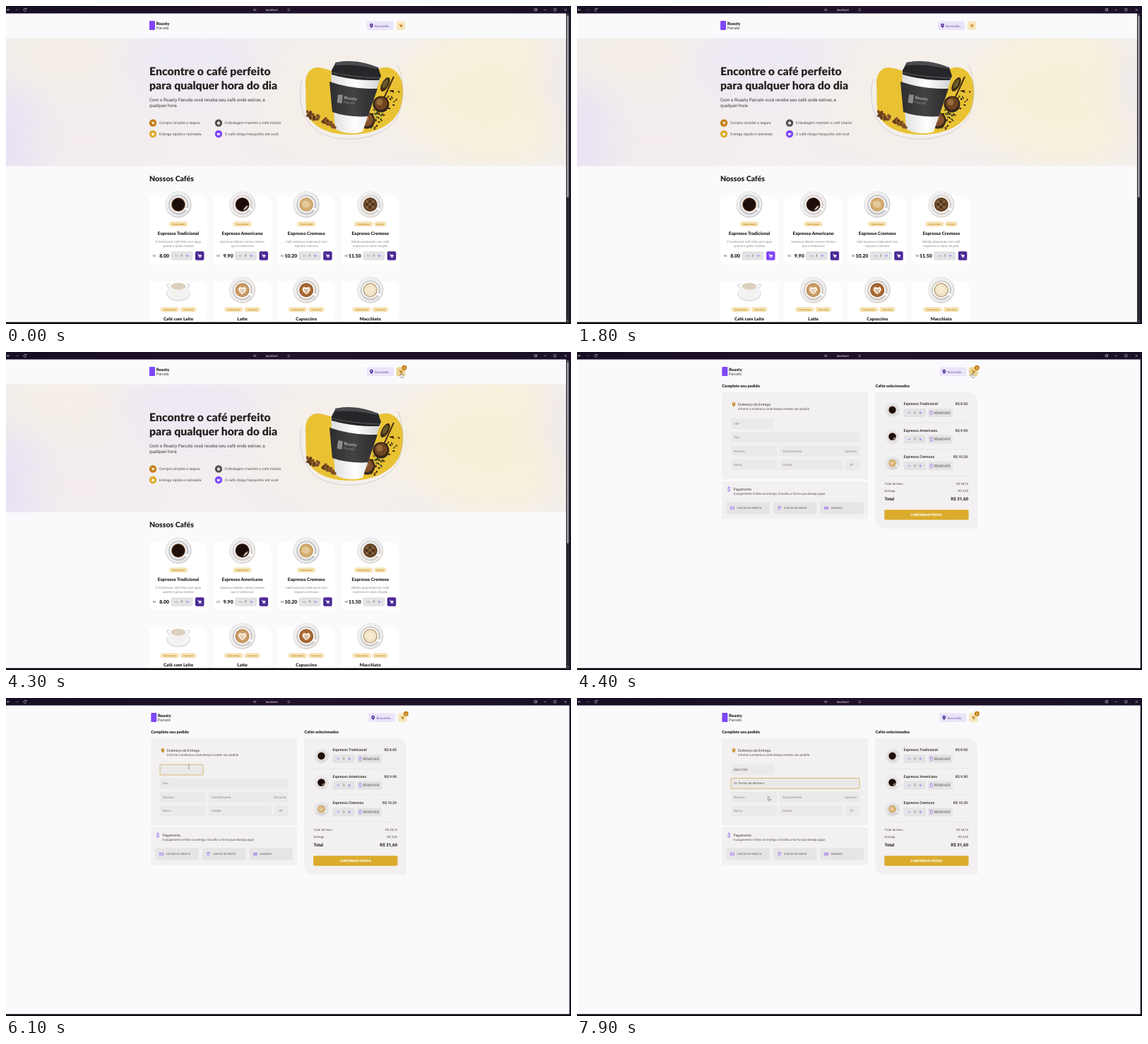
An HTML page for the animation above (8 s loop, 800 by 450 pixels).

```html
<!DOCTYPE html>
<html lang="pt-BR">
<head>
<meta charset="utf-8">
<title>Roasty Parcels</title>
<style>
html, body { margin: 0; width: 100%; height: 100%; overflow: hidden; background: #fafafc; }
svg { display: block; width: 800px; height: 450px; }
text { font-family: Roboto, sans-serif; text-rendering: geometricPrecision; white-space: pre; }
.h { font-family: Lato, sans-serif; font-weight: 900; }
</style>
</head>
<body>
<svg id="stage" viewBox="0 0 800 450"></svg>
<script>
const LOOP = 8000;
const INK = '#272221', TEXT = '#574f4d', LABEL = '#8d8686', GOLD = '#c47f17', YELLOW = '#dbac2c',
  PURPLE = '#8047f8', DEEP = '#4b2995';

// Drawing helpers
const text = (x, y, s, size, fill = TEXT, extra = '') =>
  `<text x="${x}" y="${y}" font-size="${size}" fill="${fill}" ${extra}>${s}</text>`;
const rect = (x, y, w, h, fill, r = 0, extra = '') =>
  `<rect x="${x}" y="${y}" width="${w}" height="${h}" rx="${r}" fill="${fill}" ${extra}/>`;
const disc = (x, y, r, fill, extra = '') => `<circle cx="${x}" cy="${y}" r="${r}" fill="${fill}" ${extra}/>`;
const oval = (x, y, rx, ry, fill, turn = 0, extra = '') =>
  `<ellipse rx="${rx}" ry="${ry}" fill="${fill}" transform="translate(${x} ${y}) rotate(${turn})" ${extra}/>`;
const path = (d, fill, extra = '') => `<path d="${d}" fill="${fill}" ${extra}/>`;
const line = (d, stroke, w = .6, extra = '') => path(d, 'none', `stroke="${stroke}" stroke-width="${w}" ${extra}`);
const at = (x, y, s, extra = '') => `<g transform="translate(${x} ${y})" ${extra}>${s}</g>`;
const MID = 'text-anchor="middle"', END = 'text-anchor="end"', HEAD = 'class="h"';

const cartIcon = (x, y, c, k = 1) => at(x, y,
  `<g transform="scale(${k})">` + line('M-3-2.4h1.1l1.2 3.6h2.8', c, .7) +
  path('M-1.8-1.7h4.8l-.9 2.7h-3z', c) + disc(-.4, 2.3, .65, c) + disc(1.9, 2.3, .65, c) + '</g>');
const pin = (x, y, c, hole) =>
  path(`M${x} ${y + 3}q-2.4-2.4-2.4-3.8a2.4 2.4 0 0 1 4.8 0q0 1.4-2.4 3.8z`, c) + disc(x, y - .8, .9, hole);

let seed = 7;
const rnd = () => (seed = seed * 16807 % 2147483647) / 2147483647;

// Coffee seen from above: [saucer, rim, liquid, art]
const drinks = [
  ['#c9c9cd', '#7a5236', '#1d0f09', ''],
  ['#d9d2cf', '#4a2a1e', '#1b0c08', 'shine'],
  ['#c6c7cb', '#c39a63', '#d3ac70', 'foam'],
  ['#d8d2cd', '#57391f', '#6d4a2a', 'ice'],
  ['#d9d9dc', '#efe9e1', '#ded0be', 'milk'],
  ['#d3cdc9', '#b5834d', '#c99c66', 'leaf'],
  ['#d0c8c1', '#8a5128', '#a8672f', 'leaf'],
  ['#cfcfca', '#a98a5a', '#efe3c8', 'foam']
];
function drink(i, x, y, r) {
  const [saucer, rim, liquid, art] = drinks[i];
  let s = disc(0, 0, 18.5, saucer) + disc(-.4, -.6, 17.6, '#efeff0') + disc(.3, .5, 14.2, saucer) +
    rect(8, -1.4, 8.5, 2.8, '#fff', 1.2, 'transform="rotate(28)"') +
    disc(0, 0, 11.8, '#fbfafa') + disc(0, 0, 10, rim) + disc(0, 0, 8.9, liquid);
  if (art === 'shine') s += path('M1 8q6-1 7-7q-4 1-7 7z', '#cbbdb8');
  if (art === 'foam') s += oval(-.6, -.4, 5.8, 5, '#fff4d8', 20, 'opacity=".4"');
  if (art === 'ice') for (let k = 0; k < 9; k++)
    s += rect(-6 + k % 3 * 4.2, -5.5 + (k / 3 | 0) * 4, 2.8, 2.4, k % 2 ? '#3f2a1a' : '#8f6c46', .7);
  if (art === 'leaf') s += path('M0 6q-8-5-4.5-10q3-1.5 4.5 1q1.5-2.5 4.5-1q3.5 5-4.5 10z', '#f7eddd') +
    line('M-3-1q3 3 6 0M-2 2q2 2 4 0', rim, .8);
  if (art === 'milk') s = oval(0, 5, 17, 11, '#e3e3e6') + oval(0, 4, 15.5, 9.5, '#f5f5f6') +
    line('M-10-3q-6 0-6-5q4-1 7 2M10-3q6 0 6-5q-4-1-7 2', '#dedee1', 1.6) +
    path('M-12-7Q-11 11 0 11Q11 11 12-7z', '#f3f1ef') + oval(0, -6, 12, 6.5, '#fff') + oval(0, -5.4, 10.5, 5.2, liquid);
  return `<g transform="translate(${x} ${y}) scale(${r / 18.5})">${s}</g>`;
}

function header(dx) {
  return at(dx, 0,
    rect(203, 21, 8, 13, PURPLE, 1) +
    text(212.8, 26.6, 'Roasty', 6, INK, HEAD) + text(212.8, 32.6, 'Parcels', 5.4, '#403937') +
    rect(511, 21.5, 38, 12.8, '#ebe5f9', 2) + pin(517.5, 28, DEEP, '#ebe5f9') +
    text(522.3, 29.5, 'Buscando...', 4.4, DEEP, 'opacity=".8"') +
    rect(552.8, 21.5, 12.5, 12.8, '#f6e8c0', 2, 'class="cart"') + cartIcon(559, 28, GOLD, .85) +
    at(564, 22.3, disc(0, 0, 3.5, GOLD) +
      text(0, 1.3, '', 3.7, '#fff', MID + ' class="count" font-weight="700"'), 'class="badge"'));
}

function heroCup() {
  let s = path('M424 112C423 96 431 86 443 87C462 89 480 104 498 101C515 98 529 82 545 88C562 95 567 121 558 145C549 168 523 181 490 182C455 183 426 168 425 145C424 132 425 124 424 112z', '#e9c234') +
    line('M419 104C412 136 421 167 446 180C487 199 543 184 556 153C564 132 563 102 555 84', '#b0abc8', .5);
  // Bowls, spoon and loose spices
  for (let i = 0; i < 70; i++) {
    const k = rnd();
    s += oval(552 - k * 38 + rnd() * 10 - 5, 124 + k * 42 + rnd() * 22 - 9, 1.8, 1, ['#5c3518', '#4d5f2c', '#241710'][i % 3], rnd() * 180);
  }
  s += line('M528 146L549 100', '#4a2d18', 2) + oval(537, 111, 5, 11, '#3f2b17', 28) + oval(537, 110, 3, 7, '#6a5a28', 28) +
    disc(531, 139, 11.5, '#33241c') + disc(531, 138, 9, '#704521') + disc(529, 136, 4.5, '#9a6b3b') +
    disc(511, 162, 11.5, '#3b281b') + disc(511, 161, 9, '#80522b') + disc(509, 159, 4.5, '#a3713d');
  // Paper cup
  s += path('M460 95L530 102L505 178Q484 184 466 174z', 'url(#paper)') +
    path('M458 107Q490 118 526 117L512.5 156Q485 158 462 150z', 'url(#sleeve)') +
    path('M461 91L467 80Q495 75 527 87L531 99L528 105Q491 106 461 97z', '#262729') +
    path('M466 80Q497 74 526 87L525 89Q495 82 467 84z', '#4a4b4e') +
    line('M461 94Q492 101 530 102', '#55565a', 1.2);
  s += `<g transform="translate(470 126) rotate(7)">${rect(0, -1, 7, 12, '#8b8b8d', 1)}` +
    text(9, 4.5, 'Roasty', 6, '#a5a5a7', HEAD) + text(9, 10.5, 'Parcels', 5, '#8f8f92') + '</g>';
  // Loose beans
  for (let i = 0; i < 28; i++) {
    const x = 427 + rnd() * 40, y = 153 + (x - 427) * .42 + rnd() * 8 - 4, a = rnd() * 180;
    s += oval(x, y, 3, 2, i % 2 ? '#6f431f' : '#8f5c2e', a) + oval(x, y, 2.4, .3, '#3a200e', a);
  }
  return s;
}

function card(i, name, price, lines, tags) {
  const x = 244 + i % 4 * 90.6, y = i < 4 ? 0 : 121;
  const widths = tags.map(t => t.length * 1.8 + 6.3);
  let left = -(widths.reduce((a, b) => a + b) + 2 * (tags.length - 1)) / 2;
  let s = path('M-39 269H30Q41 269 41 280V364Q41 366 39 366H-30Q-41 366-41 355V271Q-41 269-39 269z', '#fff') +
    drink(i, 0, 281, 18.5);
  tags.forEach((t, k) => {
    s += rect(left, 305, widths[k], 7, '#f5e3b5', 3.5) +
      text(left + widths[k] / 2, 309.7, t, 2.9, GOLD, MID + ' font-weight="500"');
    left += widths[k] + 2;
  });
  s += text(0, 323.5, name, 6.35, INK, `${HEAD} ${MID}`);
  if (price) s += lines.map((l, k) => text(0, 335 + k * 5.5, l, 4.35, LABEL, MID)).join('') +
    text(-36.3, 355.3, 'R$', 4) + text(-12.9, 355.8, price, 7, INK, `${HEAD} ${END}`) +
    counter(-10.5, 347.3, 31, 12.5) +
    rect(24, 347.3, 12.5, 12.5, DEEP, 2, 'class="buy"') + cartIcon(30.2, 353.5, '#fff', .95);
  return at(x, y, s);
}

const counter = (x, y, w, h) => rect(x, y, w, h, '#e4e3e3', 2) +
  line(`M${x + 5.8} ${y + h / 2}h4M${x + w - 9.8} ${y + h / 2}h4m-2-2v4`, PURPLE, .55) +
  text(x + w / 2, y + h / 2 + 1.8, 1, 5, INK, MID);

function home() {
  const glow = [[0, 190, 60, 80, '#e9e1f3'], [100, 70, 110, 50, '#f4eee6'], [110, 190, 80, 50, '#f2ebee'],
    [260, 80, 110, 60, '#eee9f3'], [480, 130, 130, 90, '#f4efe9'], [690, 125, 130, 100, '#f7f0d9'], [805, 110, 40, 70, '#eee8f0']];
  return header(0) + '<g clip-path="url(#heroClip)">' + rect(0, 44, 793, 186, '#f3eeef') +
    '<g filter="url(#soft)">' + glow.map(g => oval(...g)).join('') + '</g></g>' +
    rect(0, 44, 793, 3, 'url(#fade)') + rect(0, 225, 793, 3, 'url(#fade)', 0, 'transform="rotate(180 396.5 226.5)"') +
    text(203, 97.5, 'Encontre o café perfeito', 15.85, INK, HEAD) +
    text(203, 117.5, 'para qualquer hora do dia', 15.85, INK, HEAD) +
    text(203, 134.5, 'Com o Roasty Parcels você recebe seu café onde estiver, a', 6.3, '#403937') +
    text(203, 143, 'qualquer hora', 6.3, '#403937') +
    [[208, 165.5, GOLD, 'Compra simples e segura'], [301, 165.5, TEXT, 'Embalagem mantém o café intacto'],
     [208, 181, YELLOW, 'Entrega rápida e rastreada'], [301, 181, PURPLE, 'O café chega fresquinho até você']]
      .map(([x, y, c, s], i) => disc(x, y, 5.2, c) + text(x + 9, y + 1.7, s, 5.1) + [
        cartIcon(x, y, '#fff', .75),
        path(`M${x - 2} ${y - 1}l2-1.3 2 1.3v2.3l-2 1.2-2-1.2z`, '#fff') + line(`M${x - 2} ${y - 1}l2 1 2-1m-2 1v2`, c, .4),
        disc(x, y + .3, 1.9, '#fff') + line(`M${x} ${y + .4}v-1.2M${x - .7} ${y - 2.2}h1.4`, c, .4),
        path(`M${x - 2} ${y - 1}h3.4v1.6a1.7 1.7 0 0 1-3.4 0z`, '#fff') + line(`M${x + 1} ${y - .6}h1.2v1.3h-1.2`, '#fff', .4)
      ][i]).join('') +
    heroCup() + text(203, 248.3, 'Nossos Cafés', 10.5, INK, HEAD) +
    [['Expresso Tradicional', '8.00', ['O tradicional café feito com água', 'quente e grãos moídos'], ['TRADICIONAL']],
     ['Expresso Americano', '9.90', ['Expresso diluído, menos intenso', 'que o tradicional'], ['TRADICIONAL']],
     ['Expresso Cremoso', '10.20', ['Café expresso tradicional com', 'espuma cremosa'], ['TRADICIONAL']],
     ['Expresso Cremoso', '11.50', ['Bebida preparada com café', 'expresso e cubos de gelo'], ['TRADICIONAL', 'GELADO']],
     ...['Café com Leite', 'Latte', 'Capuccino', 'Macchiato'].map(n => [n, '', [], ['TRADICIONAL', 'COM LEITE']])]
      .map((c, i) => card(i, ...c)).join('') +
    rect(793, 10, 5, 437, '#2a282e') + rect(794, 14, 2.8, 257, '#98979c', 1.4) +
    path('M794 13l1.3-1.5 1.3 1.5zM794 444l1.3 1.5 1.3-1.5z', '#98979c');
}

const field = (x, y, w, label, id = '', lx = 4) =>
  rect(x, y, w, 14.7, '#ebe9e9', 1.3, id && `id="${id}" stroke-width=".7"`) +
  text(x + lx, y + 8.9, label, 4.4, LABEL, id && `id="${id}Text"`);

function checkout() {
  const box = '#f2f0f0';
  let s = header(2.3) +
    text(205.2, 50.3, 'Complete seu pedido', 5.7, INK, HEAD) + text(422.5, 50.3, 'Cafés selecionados', 5.7, INK, HEAD) +
    rect(205.2, 57, 207, 123, box, 2) + pin(222, 74.5, GOLD, box) +
    text(228, 75.5, 'Endereço de Entrega', 5, '#403937') +
    text(228, 82, 'Informe o endereço onde deseja receber seu pedido', 4.4) +
    field(218, 94.2, 61, 'CEP', 'zip') + field(218, 113.5, 182, 'Rua', 'street') +
    field(218, 132.9, 65.5, 'Número') + field(287, 132.9, 113, 'Complemento') +
    text(396, 141.8, 'Opcional', 4.4, LABEL, END + ' font-style="italic"') +
    field(218, 152.3, 65.5, 'Bairro') + field(287, 152.3, 89, 'Cidade') + field(379.5, 152.3, 20.5, 'UF', '', 7) +
    rect(205.2, 183.3, 207, 53, box, 2) + text(215, 197, '$', 8, PURPLE, MID) +
    text(221.5, 195.5, 'Pagamento', 5, '#403937') +
    text(221.5, 202, 'O pagamento é feito na entrega. Escolha a forma que deseja pagar', 4.4) +
    ['CARTÃO DE CRÉDITO', 'CARTÃO DE DÉBITO', 'DINHEIRO'].map((t, i) => {
      const x = 211.5 + i * 66.5;
      return rect(x, 212.3, 61.5, 17, '#e6e5e5', 2) + text(x + 15, 222.1, t, 3.65) +
        line(i === 1 ? `M${x + 6.2} 222.8h4.6m-4-1.5v-1.5m1.7 1.5v-1.5m1.7 1.5v-1.5m-3.9-.5l2.2-1.3 2.2 1.3z`
          : `M${x + 6} 219.2h5v3.4h-5zm0 1.2h5${i ? 'm-3.3 0v1.2h1.6v-1.2' : ''}`, PURPLE, .5);
    }).join('');
  s += path('M424.5 57H553Q567 57 567 71V248Q567 250 565 250H436.5Q422.5 250 422.5 236V59Q422.5 57 424.5 57z', box);
  ['Tradicional 8.00', 'Americano 9.90', 'Cremoso 10.20'].forEach((item, i) => {
    const y = i * 37.6, [name, price] = item.split(' ');
    s += at(0, y, drink(i, 446.5, 82, 10) + text(462.5, 75.2, 'Expresso ' + name, 5.2, INK, 'font-weight="500"') +
      text(553, 75.2, 'R$ ' + price, 5, INK, END + ' font-weight="500"') + counter(462.5, 80, 31.5, 12) +
      rect(497, 80, 35, 12, '#e4e3e3', 2) + line('M499.7 84h3.8m-3.3 0v4.3h2.8V84m-2-1h1.2', PURPLE, .5) +
      text(505.5, 87.8, 'REMOVER', 5) + rect(435.5, 99.8, 118.5, .5, '#dedcdc'));
  });
  [['Total de itens', '28,10', 188, 4.4], ['Entrega', '3,50', 198, 4.4], ['Total', '31,60', 209.8, 6.2, 'font-weight="700"']]
    .forEach(([l, v, y, size, w = '']) => {
      s += text(435.5, y, l, size, w ? INK : TEXT, w) + text(554, y, 'R$ ' + v, size, w ? INK : TEXT, `${END} ${w}`);
    });
  return s + rect(435.2, 223.2, 119.3, 14.2, YELLOW, 2) +
    text(494.8, 232, 'CONFIRMAR PEDIDO', 4.7, '#fff', MID + ' font-weight="700"') +
    rect(0, 0, .5, 5, INK, 0, 'id="caret"');
}

const browser = rect(0, 0, 800, 10.5, 'url(#bar)') + rect(797.7, 10, 2.3, 440, '#1c1328') + rect(0, 447.3, 800, 2.7, '#0d0a12') +
  line('M5.5 5.3h-4m1.7-1.7l-1.7 1.7 1.7 1.7', '#d5d0dc') +
  line('M13 5.3h4m-1.7-1.7l1.7 1.7-1.7 1.7', '#5c5268') +
  line('M28.6 4.2a2 2 0 1 0 .2 1.8M28.8 3v1.5h-1.5', '#d5d0dc') +
  line('M350.5 4.3h3.5v2.2h-3.5zm1.7 0v2.2M398.5 4.3h3.6m-3.6 2.2h3.6m-2.6-3v1.6m1.5.6v1.6', '#aaa2b2', .5) +
  text(376.2, 6.8, 'localhost', 4.2, '#eae6ef', MID) +
  line('M748.2 3.7h3.4v3.2h-3.4zm2.1 0v3.2M761.5 5.3h3.3M775.7 3.7h3.2v3.2h-3.2zM790.7 3.7l3.3 3.3m0-3.3l-3.3 3.3', '#d5d0dc', .55);

const grad = (id, a, b, c, dir = '') =>
  `<linearGradient id="${id}" ${dir}><stop stop-color="${a}"/><stop offset=".5" stop-color="${b}"/><stop offset="1" stop-color="${c}"/></linearGradient>`;
const outline = 'stroke="#333" stroke-width=".45"';

document.getElementById('stage').innerHTML = '<defs>' +
  grad('bar', '#170e24', '#20122a', '#1a1027') + grad('paper', '#dcdcdd', '#fff', '#d2d2d5') +
  grad('sleeve', '#2e2e30', '#434346', '#2b2b2d') +
  grad('fade', '#fafafc', 'rgba(250,250,252,.5)', 'rgba(250,250,252,0)', 'x2="0" y2="1"') +
  '<clipPath id="heroClip"><rect y="45" width="793" height="183"/></clipPath>' +
  '<filter id="soft" filterUnits="userSpaceOnUse" x="-100" y="-60" width="1000" height="400"><feGaussianBlur stdDeviation="26"/></filter></defs>' +
  rect(0, 0, 800, 450, '#fafafc') + `<g id="home">${home()}</g><g id="checkout">${checkout()}</g>` + browser +
  '<g id="cursor">' +
  path('M-.8 0v-2.4a.65.65 0 0 1 1.3 0V-.6l2 .5q.6.2.5.9L2.4 3.3H-.6L-2.4.8q-.2-.9.6-.8z', '#fff', outline) +
  path('M0-2.8V2.8L1.4 1.6L2.3 3.5L3.1 3.1L2.3 1.3H4z', '#fff', outline) +
  line('M-1-2.6h2M0-2.6v5.2M-1 2.6h2', '#555', .5) + '</g>';

// Timeline, in ms
const BUY = [[1500, 2050], [2250, 2650], [2800, 3400]];
const CART = [3900, 4750];
const ADDED = [1900, 2500, 3200];
const PAGE = 4400, ZIP = 5500, ZIP_FILL = 6400, STREET = 7300, STREET_FILL = 7600;
const CARETS = [[5500, 6100, 222, 99], [6400, 6900, 242.5, 99], [7300, 7600, 222, 118.3]];
const MOVES = [[1900, 276, 355], [2050, 276, 355], [2300, 366, 356], [2600, 366, 356], [2850, 459, 358.5], [3300, 459, 358.5],
  [3950, 560, 33], [4600, 560, 33], [5400, 259, 97], [6700, 259, 97], [7100, 270, 118], [7600, 270, 118], [7900, 270.5, 142]];

const $ = id => document.getElementById(id);
const all = sel => [...document.querySelectorAll(sel)];
const show = (el, on) => { el.style.display = on ? '' : 'none'; };
const within = (t, [a, b]) => t >= a && t < b;
const buys = all('.buy'), carts = all('.cart'), badges = all('.badge'), counts = all('.count');
const pointers = [...$('cursor').children];

function pointerAt(t) {
  const i = MOVES.findIndex(m => m[0] > t);
  if (i < 1) return (i ? MOVES[MOVES.length - 1] : MOVES[0]).slice(1);
  const [t0, x0, y0] = MOVES[i - 1], [t1, x1, y1] = MOVES[i];
  const p = (t - t0) / (t1 - t0), k = p * p * (3 - 2 * p);
  return [x0 + (x1 - x0) * k, y0 + (y1 - y0) * k];
}

function fill(id, t, from, to, typed, label, value) {
  const focus = within(t, [from, to]), content = $(id + 'Text');
  $(id).setAttribute('stroke', focus ? '#d2a044' : 'none');
  content.textContent = t >= typed ? value : focus ? '' : label;
  content.setAttribute('fill', t >= typed ? TEXT : LABEL);
}

function render(t) {
  show($('home'), t < PAGE);
  show($('checkout'), t >= PAGE);
  buys.forEach((b, i) => b.setAttribute('fill', BUY[i] && within(t, BUY[i]) ? PURPLE : DEEP));
  carts.forEach(c => c.setAttribute('fill', within(t, CART) ? '#ecd496' : '#f6e8c0'));
  const n = ADDED.filter(a => t >= a).length;
  badges.forEach(b => show(b, n));
  counts.forEach(c => { c.textContent = n; });

  fill('zip', t, ZIP, STREET, ZIP_FILL, 'CEP', '00417352');
  fill('street', t, STREET, LOOP, STREET_FILL, 'Rua', 'Av Tordos de Melvanir');
  const caret = CARETS.find(c => within(t, c));
  show($('caret'), caret);
  if (caret) $('caret').setAttribute('transform', `translate(${caret[2]} ${caret[3]})`);

  const hand = BUY.concat([CART]).some(r => within(t, r));
  const kind = hand ? 0 : within(t, [5350, 7700]) ? 2 : 1;
  pointers.forEach((p, i) => show(p, i === kind));
  show($('cursor'), t >= MOVES[0][0]);
  $('cursor').setAttribute('transform', `translate(${pointerAt(t)})`);
}

const start = performance.now();
(function tick() {
  render((performance.now() - start) % LOOP);
  requestAnimationFrame(tick);
})();
</script>
</body>
</html>
```
